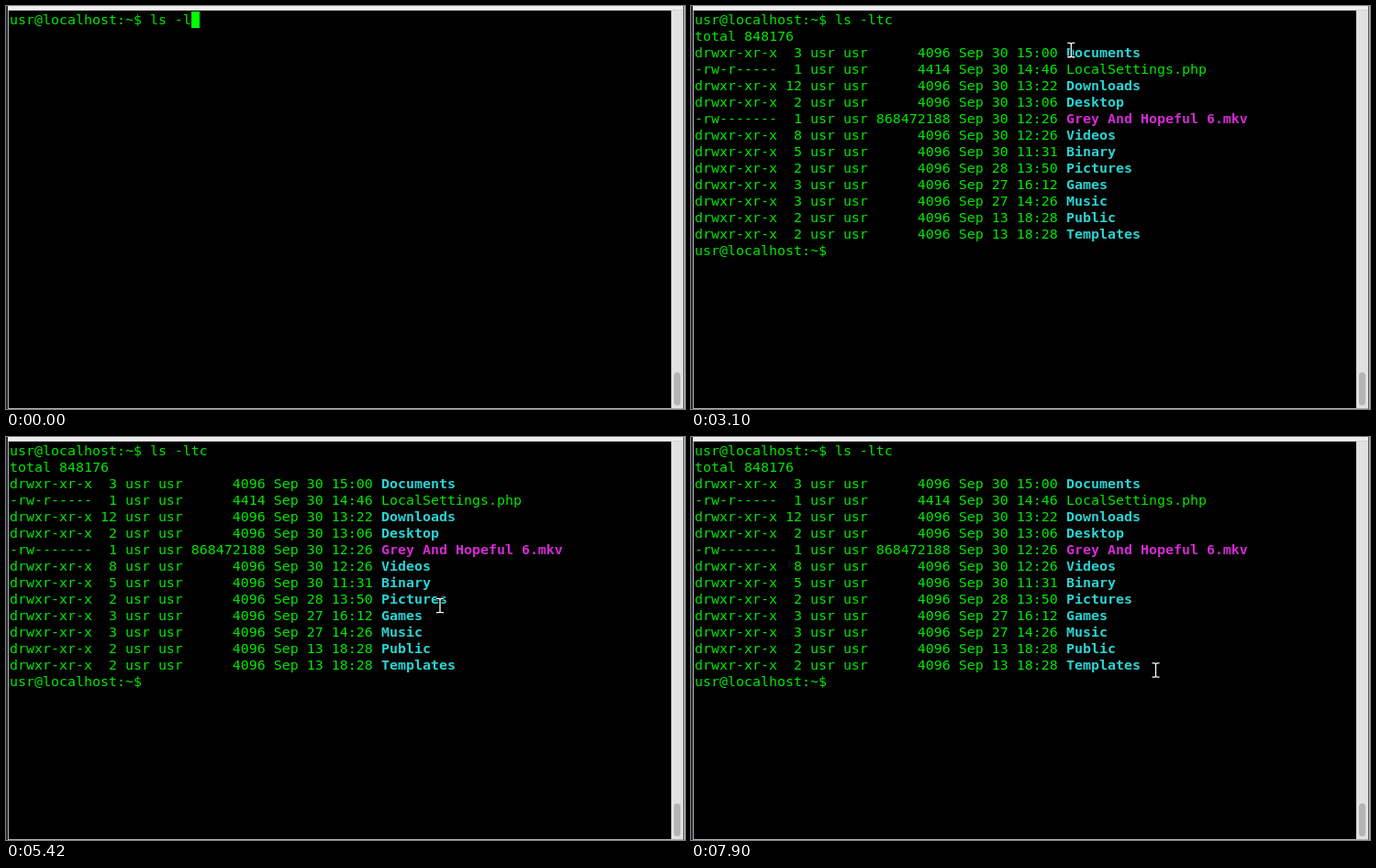
Write an HTML page that moves like this. It is 740 px wide and 440 px high and loops after 8000 ms.

```html
<!DOCTYPE html>
<html lang="en">
<head>
<meta charset="utf-8">
<title>Terminal</title>
<style>
  html, body { margin: 0; width: 100%; height: 100%; overflow: hidden; background: #000; }
  svg { display: block; width: 740px; height: 440px; }
  text { font: 14.95px "DejaVu Sans Mono", monospace; white-space: pre; fill: #00e800; }
  .dir { font-weight: bold; fill: #2ad4d4; }
  .media { font-weight: bold; fill: #d42ad4; }
  .picked { font-weight: bold; fill: #000; }
  #pointer path { fill: none; stroke: #000; stroke-width: 3; }
  #pointer path + path { stroke: #fff; stroke-width: 1.3; }
</style>
</head>
<body>
<svg viewBox="0 0 740 440">
  <rect width="740" height="440"/>
  <rect width="2" height="440" fill="#25282c"/>
  <rect x="2" width="1" height="440" fill="#b0b0b8"/>
  <rect x="2" width="736" height="5" fill="#ededed"/>
  <rect x="2" y="4" width="736" height="1" fill="#d4d4d4"/>
  <rect x="725" y="5" width="13" height="434" fill="#e1e1e1"/>
  <rect x="728" y="400" width="7" height="36" rx="3.5" fill="#b4b4b4"/>
  <rect x="738" width="1" height="440" fill="#555"/>
  <rect x="739" width="1" height="440" fill="#b8b8b8"/>
  <rect x="2" y="439" width="736" height="1" fill="#b0b0b8"/>
  <text id="command" x="4" y="20"></text>
  <g id="listing"></g>
  <g id="selection">
    <rect id="pickedBox" fill="#2ad4d4" height="18"/>
    <rect id="pickedRest" fill="#0f0" height="18"/>
    <text id="pickedText" class="picked"></text>
  </g>
  <rect id="caret" width="9" height="18" fill="#0f0"/>
  <g id="pointer"></g>
</svg>
<script>
const LOOP = 8000, CELL = 9, LINE = 18, LEFT = 4, TOP = 6, RIGHT = 724;
const NAME_COL = 45, FIRST_ROW = 2, LISTED = 1390;
const STEP = 45, BLINK = 575, BLINK_START = 1905;
const PROMPT = 'usr@localhost:~$ ';

const files = `
drwxr-xr-x  3 usr usr      4096 Sep 30 15:00 Documents
-rw-r-----  1 usr usr      4414 Sep 30 14:46 LocalSettings.php
drwxr-xr-x 12 usr usr      4096 Sep 30 13:22 Downloads
drwxr-xr-x  2 usr usr      4096 Sep 30 13:06 Desktop
-rw-------  1 usr usr 868472188 Sep 30 12:26 Grey And Hopeful 6.mkv
drwxr-xr-x  8 usr usr      4096 Sep 30 12:26 Videos
drwxr-xr-x  5 usr usr      4096 Sep 30 11:31 Binary
drwxr-xr-x  2 usr usr      4096 Sep 28 13:50 Pictures
drwxr-xr-x  3 usr usr      4096 Sep 27 16:12 Games
drwxr-xr-x  3 usr usr      4096 Sep 27 14:26 Music
drwxr-xr-x  2 usr usr      4096 Sep 13 18:28 Public
drwxr-xr-x  2 usr usr      4096 Sep 13 18:28 Templates`.trim().split('\n');

const $ = id => document.getElementById(id);
const colX = col => LEFT + col * CELL;
const rowY = row => TOP + row * LINE;
const nameOf = file => file.slice(NAME_COL);
const easeOut = u => 1 - (1 - u) ** 2;

// The pointer glides from stop to stop; a glide with `clear` drags a selection until then.
const entry = { x: 720, y: 296 };
const glides = [
  { start: 1910, end: 2150, x: 526, y: 251.5 },
  { start: 2380, end: 3140, x: 414, y: 47.5 },
  { start: 3640, end: 4200, x: 500, y: 47.5, clear: 4960 },
  { start: 4380, end: 4580, x: 493.5, y: 175.5 },
  { start: 5250, end: 5410, x: 473, y: 184 },
  { start: 5410, end: 6030, x: 413.5, y: 159.5 },
  { start: 6430, end: 6840, x: 505, y: 159.5, clear: 7900 },
  { start: 7080, end: 7280, x: 506.5, y: 254.5 }
];

function place(node, x, y) {
  node.setAttribute('x', x);
  node.setAttribute('y', y);
}

function show(node, visible) {
  node.style.display = visible ? '' : 'none';
}

function addText(col, row, content, kind = '') {
  const node = document.createElementNS('http://www.w3.org/2000/svg', 'text');
  node.setAttribute('class', kind);
  place(node, colX(col), rowY(row) + 14);
  node.textContent = content;
  $('listing').append(node);
}

function build() {
  addText(0, 1, 'total 848176');
  files.forEach((file, i) => {
    const kind = file[0] === 'd' ? 'dir' : file.endsWith('.mkv') ? 'media' : '';
    addText(0, FIRST_ROW + i, file.slice(0, NAME_COL));
    addText(NAME_COL, FIRST_ROW + i, nameOf(file), kind);
  });
  addText(0, FIRST_ROW + files.length, PROMPT);
  const half = '0 6.5V0M-4 7.7h2.2q1.8 0 1.8-1.5q0 1.5 1.8 1.5h2.2';
  const beam = `<path d="M${half}M0-6.5V0M-4-7.7h2.2q1.8 0 1.8 1.5q0-1.5 1.8-1.5h2.2"/>`;
  $('pointer').innerHTML = beam + beam;
}

function pointerAt(t) {
  const i = glides.findLastIndex(g => g.start <= t);
  if (i < 0) return null;
  const to = glides[i], from = glides[i - 1] || entry;
  const stepped = Math.floor((t - to.start) / STEP) * STEP;
  const u = t >= to.end ? 1 : easeOut(stepped / (to.end - to.start));
  return { x: from.x + (to.x - from.x) * u, y: from.y + (to.y - from.y) * u };
}

function drawSelection(t) {
  const drag = glides.find(g => t >= g.start && t < g.clear);
  show($('selection'), drag);
  if (!drag) return;
  const row = Math.floor((drag.y - TOP) / LINE);
  const name = nameOf(files[row - FIRST_ROW]);
  const left = colX(NAME_COL), y = rowY(row);
  const cols = Math.max(0, Math.floor((pointerAt(Math.min(t, drag.end)).x - left) / CELL));
  const width = Math.min(cols, name.length) * CELL;
  place($('pickedBox'), left, y);
  $('pickedBox').setAttribute('width', width);
  place($('pickedRest'), left + width, y);
  $('pickedRest').setAttribute('width', cols > name.length ? RIGHT - left - width : 0);
  place($('pickedText'), left, y + 14);
  $('pickedText').textContent = name.slice(0, cols);
}

function drawCaret(t, command) {
  const listed = t >= LISTED;
  const blinkedOff = t >= BLINK_START && Math.floor((t - BLINK_START) / BLINK) % 2 === 0;
  const typing = t >= 440 && t < 490;
  show($('caret'), !blinkedOff && !typing);
  if (listed) place($('caret'), colX(PROMPT.length), rowY(FIRST_ROW + files.length));
  else place($('caret'), colX(command.length), rowY(0));
}

function draw(t) {
  const command = PROMPT + 'ls -l' + (t >= 490 ? 't' : '') + (t >= 890 ? 'c' : '');
  $('command').textContent = command;
  show($('listing'), t >= LISTED);
  drawCaret(t, command);
  drawSelection(t);

  const pos = pointerAt(t);
  show($('pointer'), pos);
  if (pos) $('pointer').setAttribute('transform', `translate(${pos.x} ${pos.y})`);
}

function tick() {
  draw(performance.now() % LOOP);
  requestAnimationFrame(tick);
}

build();
tick();
</script>
</body>
</html>
```
